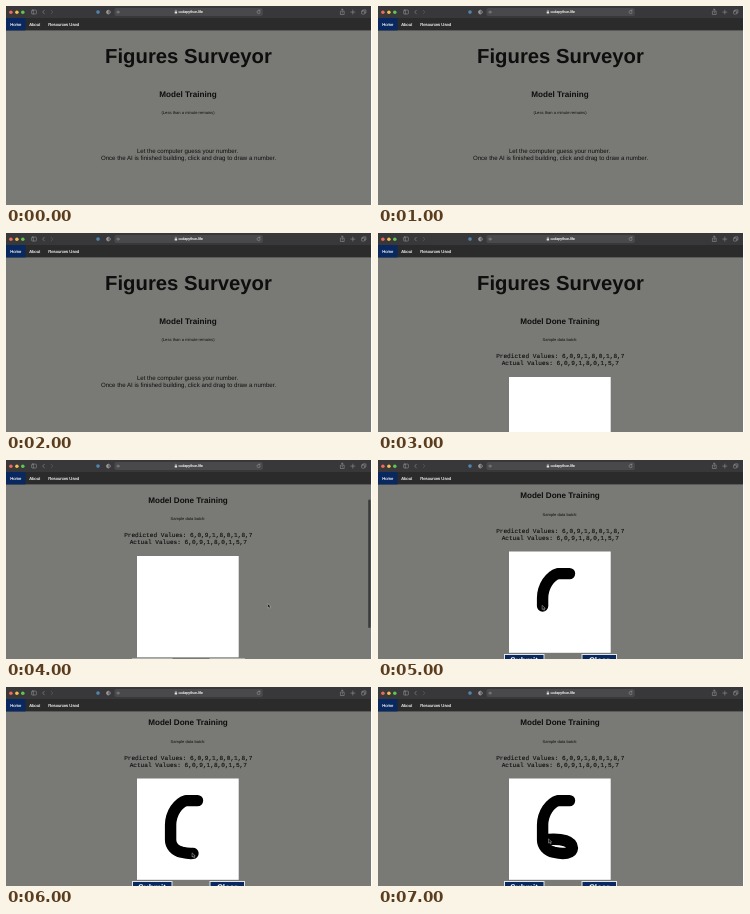
An HTML page that plays this animation: 366 px wide and 199 px high, repeating every 8 s.

```html
<!DOCTYPE html>
<html lang="en">
<head>
<meta charset="utf-8">
<title>Figures Surveyor</title>
<style>
html, body { margin: 0; width: 100%; height: 100%; overflow: hidden; background: #797976; }
svg { display: block; width: 100%; height: 100%; }
text { font-family: "Liberation Sans", Arial, sans-serif; fill: #0e0e0e; white-space: pre; text-rendering: geometricPrecision; }
.mid { text-anchor: middle; }
.b { font-weight: bold; }
.mono { font-family: "Liberation Mono", "Courier New", monospace; font-size: 6.12px; stroke: #0e0e0e; stroke-width: .1; }
.light text { fill: #f4f4f4; stroke: #f4f4f4; stroke-width: .12; font-size: 4.2px; }
.icon { fill: none; stroke: #98989a; stroke-width: .55; stroke-linecap: round; stroke-linejoin: round; }
.btn rect { fill: #08285f; stroke: #e4e6ea; stroke-width: 1; }
.btn text { fill: #fff; font-size: 8.2px; }
</style>
</head>
<body>
<svg viewBox="0 0 366 199">
  <rect width="366" height="199" fill="#797976"/>

  <g id="page">
    <text class="mid b" x="182.5" y="56.8" font-size="20.3">Figures Surveyor</text>
    <g id="wait">
      <text class="mid b" x="182" y="90.7" font-size="8.15">Model Training</text>
      <text class="mid" x="182" y="108" font-size="4.1">(Less than a minute remains)</text>
      <text class="mid" x="181.5" y="147.1" font-size="6.12">Let the computer guess your number.</text>
      <text class="mid" x="182.5" y="154.1" font-size="6.12">Once the AI is finished building, click and drag to draw a number.</text>
    </g>
    <g id="done">
      <text class="mid b" x="182" y="90.7" font-size="8.1">Model Done Training</text>
      <text class="mid" x="182" y="108" font-size="4.06">Sample data batch:</text>
      <text class="mid mono" x="182.3" y="125.2">Predicted Values: 6,0,9,1,8,0,1,8,7</text>
      <text class="mid mono" x="182.3" y="132.1">Actual Values: 6,0,9,1,8,0,1,5,7</text>
      <rect x="131" y="144" width="101.7" height="101.3" fill="#fff"/>
      <g class="btn">
        <rect x="126.5" y="247" width="39.5" height="14"/>
        <text class="mid b" x="146.2" y="255.6">Submit</text>
        <rect x="204" y="247" width="34.5" height="14"/>
        <text class="mid b" x="221.2" y="255.6">Clear</text>
      </g>
    </g>
  </g>

  <path id="ink" fill="none" stroke="#000" stroke-width="11.4" stroke-linecap="round" stroke-linejoin="round"
    d="M191.5 113.6H180C172 116 164.8 126 164.6 138V153C164.6 159 169 163.5 176 165.3C186 167.6 194 166.5 194.4 161C194 154 184 151.6 171 152.4"/>
  <path id="arrow" d="M0 0V4.2L1 3.3L1.8 5L2.6 4.6L1.9 3H3.2Z" fill="#0a0a0a" stroke="#d8d8d8" stroke-width=".4"/>
  <rect id="scroll" x="362.2" y="39.5" width="2.5" height="128.5" rx="1.25" fill="#3b3b3b"/>

  <rect width="366" height="24.4" fill="#2b2b2b"/>
  <rect width="366" height="12" fill="#38383a"/>
  <circle cx="4.9" cy="6.2" r="1.75" fill="#ed6a5e"/>
  <circle cx="10.9" cy="6.2" r="1.75" fill="#f4be4f"/>
  <circle cx="16.8" cy="6.2" r="1.75" fill="#61c554"/>
  <rect x="108.5" y="2" width="148.3" height="8" rx="1.8" fill="#49494b"/>
  <g class="icon">
    <rect x="25.6" y="4.1" width="4.8" height="3.9" rx=".7"/>
    <path d="M27.3 4.1V8M38.3 4.3L36.7 6.1L38.3 7.9"/>
    <path d="M45.2 4.3L46.8 6.1L45.2 7.9" stroke="#666668"/>
    <circle cx="102.4" cy="6.1" r="1.9"/>
    <path d="M102.4 4.2A1.9 1.9 0 0 0 102.4 8Z" fill="#98989a"/>
    <circle cx="112" cy="6.1" r="1.1"/>
    <path d="M253.7 4.8A1.6 1.6 0 1 0 254.2 6.2M253.9 3.8V4.9H252.8"/>
    <path d="M335.2 5.2H334.4V8.5H338.2V5.2H337.4M336.3 7V3L335.3 4M336.3 3L337.3 4"/>
    <path d="M344.8 6.1H348.8M346.8 4.1V8.1"/>
    <rect x="355.6" y="5" width="3.1" height="3.1" rx=".5"/>
    <path d="M356.8 5V3.9H359.9V7H358.7"/>
  </g>
  <circle cx="92" cy="6.1" r="1.8" fill="#4d86ae"/>
  <rect x="168.7" y="5.6" width="2.4" height="2" rx=".3" fill="#e2e2e3"/>
  <path d="M169.2 5.7V4.9A.7 .7 0 0 1 170.6 4.9V5.7" fill="none" stroke="#e2e2e3" stroke-width=".4"/>

  <g class="light">
    <text x="172.4" y="7.3" style="font-size: 3.65px">codapython.life</text>
    <rect y="12" width="19.5" height="12.4" fill="#08285f"/>
    <text x="4.2" y="19.9">Home</text>
    <text x="23.2" y="19.9">About</text>
    <text x="42.2" y="19.9">Resources Used</text>
  </g>
  <rect x="365" width="1" height="199" fill="#fff"/>
</svg>
<script>
const get = id => document.getElementById(id);
const page = get('page'), ink = get('ink'), arrow = get('arrow');
const LOOP = 8000;
const total = ink.getTotalLength();

// Each state holds until the next; `drawn` is the share of the stroke.
const states = [
  { at: 0, scroll: 0 },
  { at: 3000, scroll: 0, done: true },
  { at: 4000, scroll: 48, done: true, bar: true, pointer: [261.7, 143.7] },
  { at: 5000, scroll: 52.5, done: true, drawn: 50 / total },
  { at: 6000, scroll: 52.5, done: true, drawn: 86 / total },
  { at: 7000, scroll: 52.5, done: true, drawn: 1 }
];

const show = (el, on) => { el.style.display = on ? '' : 'none'; };

function render(ms) {
  const t = ms % LOOP;
  const s = states.filter(k => k.at <= t).pop();
  const length = (s.drawn || 0) * total;
  page.setAttribute('transform', `translate(0 ${-s.scroll})`);
  show(get('wait'), !s.done);
  show(get('done'), s.done);
  show(get('scroll'), s.bar);
  show(ink, s.drawn);
  ink.setAttribute('stroke-dasharray', `${length} ${total + 20}`);

  const tip = ink.getPointAtLength(length);
  const [x, y] = s.pointer || [tip.x - .5, tip.y - .5];
  show(arrow, s.pointer || s.drawn);
  arrow.setAttribute('transform', `translate(${x} ${y})`);
}

const start = performance.now();
function tick() {
  render(performance.now() - start);
  requestAnimationFrame(tick);
}
tick();
</script>
</body>
</html>
```
